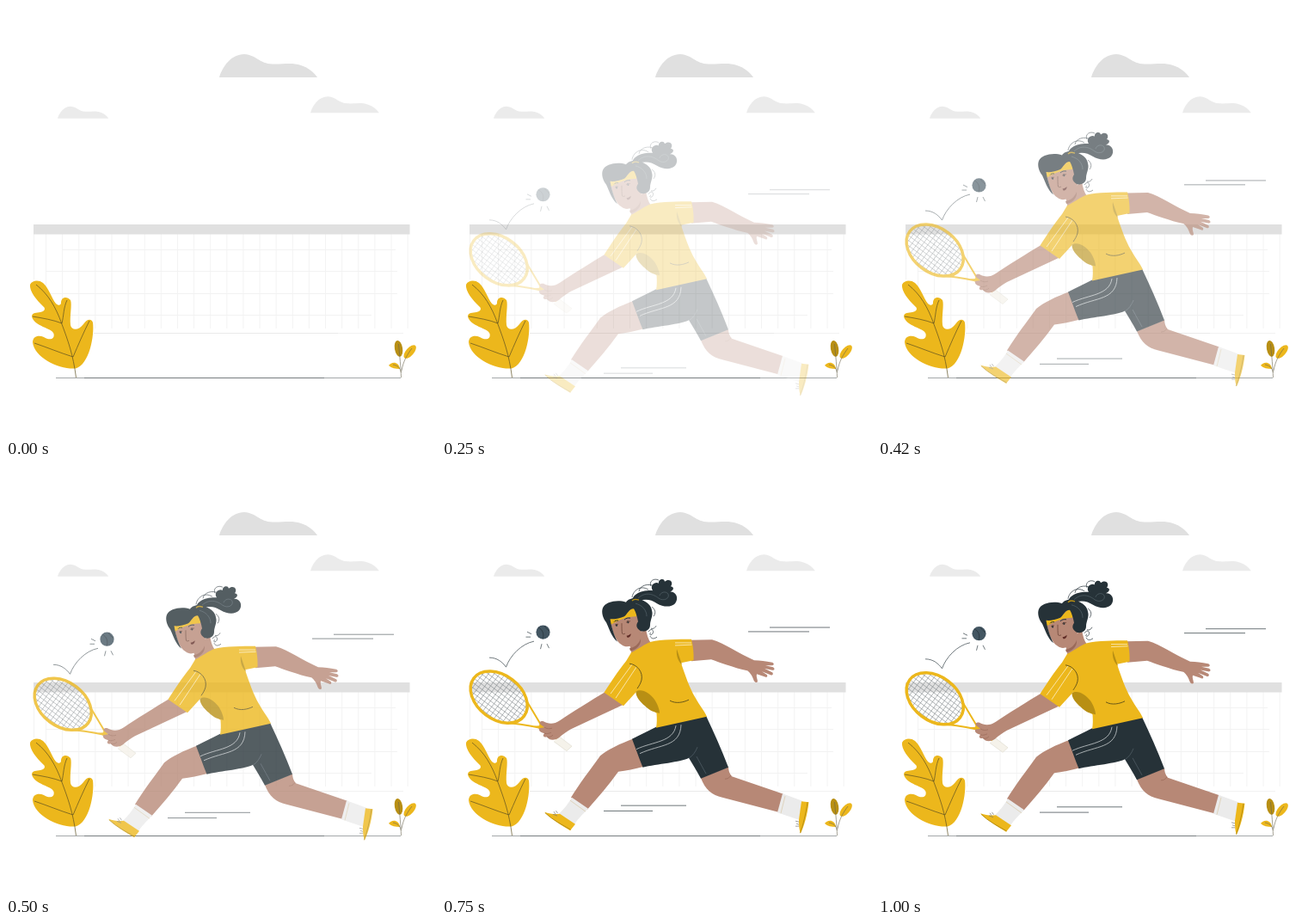
Write an HTML page with a canvas that moves like this. It is 500x500 px and loops after 1040 ms.

```html
<!DOCTYPE html>
<html lang="en">
<head>
<meta charset="utf-8">
<title>Tennis player</title>
<style>
  html, body { margin: 0; width: 100%; height: 100%; overflow: hidden; background: #fff; }
  canvas { display: block; width: 500px; height: 500px; }
</style>
</head>
<body>
<canvas id="stage"></canvas>
<script>
const SIZE = 500, LOOP = 1040, SHOW_AT = 130, LEAD = 20, RISE = 30, REST = .8;
const YELLOW = '#ecb71c', GOLD = '#b88f14', DARK = '#263238', SKIN = '#b78876', SHADE = '#9a6a5a';
const GREY = '#e0e0e0', PALE = '#ebebeb', CREAM = '#f5f2ea';

const dpr = window.devicePixelRatio || 1;
const stage = document.getElementById('stage');
const layer = document.createElement('canvas');
stage.width = stage.height = layer.width = layer.height = SIZE * dpr;
const view = stage.getContext('2d');
const pen = layer.getContext('2d');

function fill(c, color, d) {
  c.fillStyle = color;
  c.fill(new Path2D(d));
}

function line(c, color, width, d) {
  c.strokeStyle = color;
  c.lineWidth = width;
  c.stroke(new Path2D(d));
}

function oval(c, color, x, y, rx, ry, deg = 0) {
  c.fillStyle = color;
  c.beginPath();
  c.ellipse(x, y, rx, ry, deg * Math.PI / 180, 0, 7);
  c.fill();
}

function cloud(c, color, x, y, k) {
  c.save();
  c.translate(x, y);
  c.scale(k, k);
  fill(c, color, 'M0 0C4 -13 14 -27 29 -27C44 -26 46 -16 62 -15.5C74 -15 84 -18 95 -14C104 -11 110 -6 114 0Z');
  c.restore();
}

function drawNet(c) {
  for (let i = 0; i < 24; i++) {
    const x = i ? 46.5 + (i - 1) * 19.12 : 32.5;
    line(c, '#f3f3f3', 1, `M${x} 265V${i ? 375 : 318}`);
  }
  line(c, '#f2f2f2', 1, 'M65 283.5H453M46 308.5H455M46 334.5H455M46 359.5H425');
  line(c, '#eaeaea', 1, 'M102 380.5H386');
  line(c, '#f2f2f2', 1, 'M386 380.5H462');
  c.fillStyle = GREY;
  c.fillRect(32, 254, 437.5, 11.5);
}

function drawPlants(c) {
  fill(c, YELLOW, 'M81 421.5C62 423 33 409 31 391C31 384 38 382 44 385C50 389 57 388 55.5 381' +
    'C53 374 33 373 30 361C30 356 36 357 40 356C45 355 46 352 44 350C35 342 27 331 28 324' +
    'C30 319 38 318 43 322C50 328 53 340 58 346C61 349 64 348 64 345C64 338 71 337 75 342' +
    'C77 347 74 360 75 371C76 377 84 378 90 370C94 364 99 363 101 368C103 383 97 417 81 421.5Z');
  line(c, '#5c4f22', .7, 'M35 324C49 335 58 350 65 370C72 389 78 405 81.5 432' +
    'M31 361C43 363 55 365 65 369M65 369C67 361 67 350 71 342' +
    'M33 392C48 397 62 403 78 408M78 408C84 394 90 380 97 366');

  oval(c, GOLD, 456.5, 398.3, 4.6, 9.5, -10);
  oval(c, YELLOW, 469.7, 402, 4.6, 9.6, 41);
  fill(c, YELLOW, 'M445 418C448 413 457 413 458 422C453 422 448 421 445 418Z');
  line(c, '#6b6650', .6, 'M459.5 432C459 419 458 409 456.5 393M460 424C462 413 466 406 472 398M459.5 426C458 420 455 418 450 417');
}

function drawScene(c) {
  cloud(c, GREY, 248, 83, 1);
  cloud(c, PALE, 354, 124.2, .7);
  cloud(c, PALE, 60, 130.8, .52);
  drawNet(c);
  drawPlants(c);
  line(c, '#a4a8aa', 1, 'M58 432.5H459');
  line(c, '#777d80', 1, 'M91 432.5H370');
}

function drawBall(c) {
  line(c, '#4d585d', .8, 'M55 226C64 226 70 231 74.5 237C79 224 92 210 107 207' +
    'M97.5 202H103M99 196L104 198.5M116 210L114.5 216M122 210L124.5 215');
  oval(c, '#435662', 117.5, 196.4, 8.1, 8.1);
  line(c, DARK, .7, 'M112 191C117 193 119 199 117 204M119 189C121 192 123 194 125 195');
}

function drawSpeedLines(c) {
  line(c, '#6d7579', 1, 'M381 190.9H451M356 195.8H427M208 398H284M188 404.3H245');
}

function drawRacket(c) {
  c.save();
  c.translate(66.2, 272);
  c.rotate(37 * Math.PI / 180);
  c.beginPath();
  c.ellipse(0, 0, 36.6, 25.6, 0, 0, 7);
  c.save();
  c.clip();
  let d = '';
  for (let i = -7; i <= 7; i++) d += `M${i * 5.2} -28V28M-38 ${i * 4.7}H38`;
  line(c, '#7d8487', .55, d);
  c.restore();
  c.strokeStyle = YELLOW;
  c.lineWidth = 3.5;
  c.stroke();
  c.restore();
  line(c, YELLOW, 2, 'M99.5 278L118 309M79 302C93 303.5 106 305 119 309');
  fill(c, YELLOW, 'M114 301L121 309L118 311L107 305.5L113 305Z');
  line(c, YELLOW, 4, 'M118 308.5L136 321.5');
  fill(c, CREAM, 'M136 317.5L151 329L145 334.5L130 323.5Z');
  line(c, '#dcd8cc', .6, 'M136 317.5L151 329L145 334.5L130 323.5');
}

function drawLegs(c) {
  fill(c, SKIN, 'M301 366C306 379 314 386 326 388.5L391 405.5L397 384.5L337 364C334 360 333 357 333 353Z');
  line(c, SHADE, .7, 'M336 363C334 366 332 367 329 367');
  fill(c, PALE, 'M396 384L419 392.5L415 414.5L390 406Z');
  line(c, '#d8c9a8', .7, 'M399 387L394 407');
  fill(c, YELLOW, 'M418 393L426.5 394C425 408 421 422 417 430C415 426 415 420 415 414Z');
  line(c, GOLD, 1, 'M425 394C423 408 420 420 416.5 430');
  line(c, '#777', .7, 'M411 416L415 417M412 419L415 420M411 422L415 422');

  fill(c, SKIN, 'M223 320C207 326 192 333 184 340C174 354 160 372 150 388.5L169 402.5C181 389 194 374 205 358.5C214 357.5 224 355.5 235 352.5Z');
  fill(c, PALE, 'M151 388.5L170 401.5C164 407.5 158 413.5 154 419.5L136 407.5C142 401.5 147 395.5 151 388.5Z');
  line(c, '#d8c9a8', .7, 'M149 392L167 405');
  fill(c, YELLOW, 'M119 405.5C126 408 132 408 137 407.5L155 419.5L149 427C140 421.5 127 413.5 119 405.5Z');
  line(c, GOLD, 1, 'M120 406.5C128 414.5 140 420.5 149.5 426');
  line(c, '#777', .7, 'M130 405L132 408M132.5 404L134.5 407M129 408L134 410');

  fill(c, DARK, 'M221 320.5C230 315.5 240 311.5 249 306.5L307 293.5C316 312.5 325 332.5 333 353.5L301 366.5C296 357.5 291 349 287 342.5C278 347.5 250 349.5 233.5 353.5C229 342.5 225 331 221 320.5Z');
  line(c, '#c9ced0', .8, 'M226 332.5C245 323.5 269 324.5 272 305M230 337.5C254 326.5 277 330 278 304');
  line(c, '#55626a', .7, 'M287 343C292 340 295 335 297 330M296 341L307 361');
}

function drawBody(c) {
  fill(c, SKIN, 'M288 205.5L314 205C328 209 345 221 363 229C370 229 376 230 384 231.5C387 233 386 235 383 235L376 235' +
    'L385 237C388 239 386 241 384 240.5L375 238.7L384 243C386 245 384 247 382 246L372 242L378 246C379 249 377 249 375 248' +
    'L366 245C365 248 367 251 367 254C365 256 363 254 362 251C361 247 357 242 355 241C340 238 322 231 313 228L290 230Z');
  fill(c, SKIN, 'M192 264.5C172 276.5 151 289.5 137 299C130 304 123 303 118 300C114 299 112 302 115 304L119 307L113 308C112 311 115 313 119 314' +
    'C116 317 119 319 122 318C125 323 132 322 136 319C140 315 145 312 150 309L211 280.5Z');
  line(c, SHADE, .7, 'M119 307C122 309 125 309 128 308M119 314C122 315 125 314 127 313M122 318C125 319 127 318 129 316');

  fill(c, SKIN, 'M222 204L237 192C238 199 240 205 243 209L220 221C220 217 219 214 218 211Z');
  fill(c, SHADE, 'M218 215C224 214 229 210 231 204C232 211 226 217 219 218Z');

  fill(c, YELLOW, 'M220 220C227 217 236 209.5 243 207.5C255 204.5 275 204.5 290 204.5C292 212 293 222 292.5 229L278 232' +
    'C282 244.5 288 261.5 294 271.5C300 282.5 305 287.5 308 294.5L249 307.5C250 302 250 297 249.5 290.5C241 285 230 277 227 264.5' +
    'L211 282L188.5 266.5C196 255 205 241 214 230Z');
  fill(c, GOLD, 'M225.5 265.5C232 261.5 241 266.5 247 274.5C251 280.5 253 287 253 290.5C244 289 240 286 236 282C231 278 225 271.5 225.5 265.5Z');
  fill(c, GOLD, 'M273 216C275 222 277 228 279 234C275 231 272 224 273 216Z');
  line(c, '#fbe9b5', .9, 'M221 234L196 268M226 237L202 273M271 208.8H290M271 211.8L290.5 211');
  line(c, '#4a4118', .8, 'M218 233C227 234 234 243 232 252C231 256 229 259 227 262M265 276C272 280 281 278 287 275');
}

function drawHead(c) {
  fill(c, DARK, 'M221 163C220 153 230 147.5 245 148C241 142 248 137 252 139.5C251 135.5 258 132.5 259 137.5C264 133 270 138 266 143' +
    'C271 144 269 148 265 149.5C272 149 276 157 271 163C266 168 257 167 250 163C241 157 232 157 222 164Z');
  line(c, DARK, .7, 'M221 156C222 148 231 141 240 147M229 149C230 142 240 139 247 143M243 143C240 137 247 133 252 136M244 167C248 170 249 174 246 178');
  line(c, '#5c6a71', .6, 'M228 157C236 149 246 152 252 157C258 161 265 157 263 152C260 148 254 150 253 154');

  fill(c, SKIN, 'M195 181C198 193 201 207 209 211C214 215 221 213 225 208L233 194V168H222Z');
  fill(c, YELLOW, 'M194 181C204 181 214 177 222 167L228 168L226 178C215 178 206 182 196.5 187.5Z');
  fill(c, DARK, 'M204 207.5C197 202 194 191 191 185C187 180 185 173 187 168C190 161 204 158 214 161.5C217 156.5 226 155.5 232 158.5' +
    'C239 161.5 243 165 244 171C246 177 242 182 242 188C242 194 236 196.5 231 195C226 192 225 188 228 184C227 178 225 172 223 169' +
    'C217 169 216 175 212 178C207 180.5 200 181.5 195.5 181C197 190 200 200 204 207.5Z');
  line(c, '#5c6a71', .6, 'M225 163C233 165 238 171 238 178');
  line(c, GOLD, 1.3, 'M221 160C223 157 226 158 229 159');
  line(c, DARK, .7, 'M240 196C243 191 247 194 245 198C243 201 240 199 243 197M242 201C244 205 247 204 250 202M243 192C246 193 248 191 249 189');

  line(c, DARK, 1, 'M200 184.5C201 183 203 182.5 205 183M212 182C214 180 216 179.5 219 180');
  oval(c, DARK, 203, 188.2, 1.1, 1.5, -15);
  oval(c, DARK, 216.3, 184.6, 1.1, 1.5, -15);
  line(c, '#6d4438', .8, 'M209 186C209 191 209 195 209.5 198C210.5 199 212 198.5 213 198M201 188L205 187M214 185L219 183.5');
  fill(c, '#5f2c26', 'M214.5 200.5C216.5 200.5 218 199.5 219.5 198C220 200.5 217.5 203 215.5 202.5Z');
}

function drawPlayer(c) {
  drawSpeedLines(c);
  drawBall(c);
  drawRacket(c);
  drawLegs(c);
  drawBody(c);
  drawHead(c);
}

const cubic = (a, b, s) => 3 * (1 - s) * (1 - s) * s * a + 3 * (1 - s) * s * s * b + s * s * s;

// cubic-bezier(.36, -.01, .5, 1.38): settles after a slight overshoot
function ease(x) {
  if (x >= 1) return 1;
  let lo = 0, hi = 1;
  for (let i = 0; i < 24; i++) {
    const mid = (lo + hi) / 2;
    if (cubic(.36, .5, mid) < x) lo = mid; else hi = mid;
  }
  return cubic(-.01, 1.38, lo);
}

function frame() {
  const t = performance.now() % LOOP;
  view.setTransform(dpr, 0, 0, dpr, 0, 0);
  view.fillStyle = '#fff';
  view.fillRect(0, 0, SIZE, SIZE);
  drawScene(view);
  if (t >= SHOW_AT) {
    const p = ease((t + LEAD) / 1000);
    pen.setTransform(dpr, 0, 0, dpr, 0, 0);
    pen.clearRect(0, 0, SIZE, SIZE);
    pen.translate(0, REST + RISE * (1 - p));
    drawPlayer(pen);
    view.globalAlpha = Math.max(0, Math.min(1, p));
    view.drawImage(layer, 0, 0, SIZE, SIZE);
    view.globalAlpha = 1;
  }
  requestAnimationFrame(frame);
}

frame();
</script>
</body>
</html>
```
